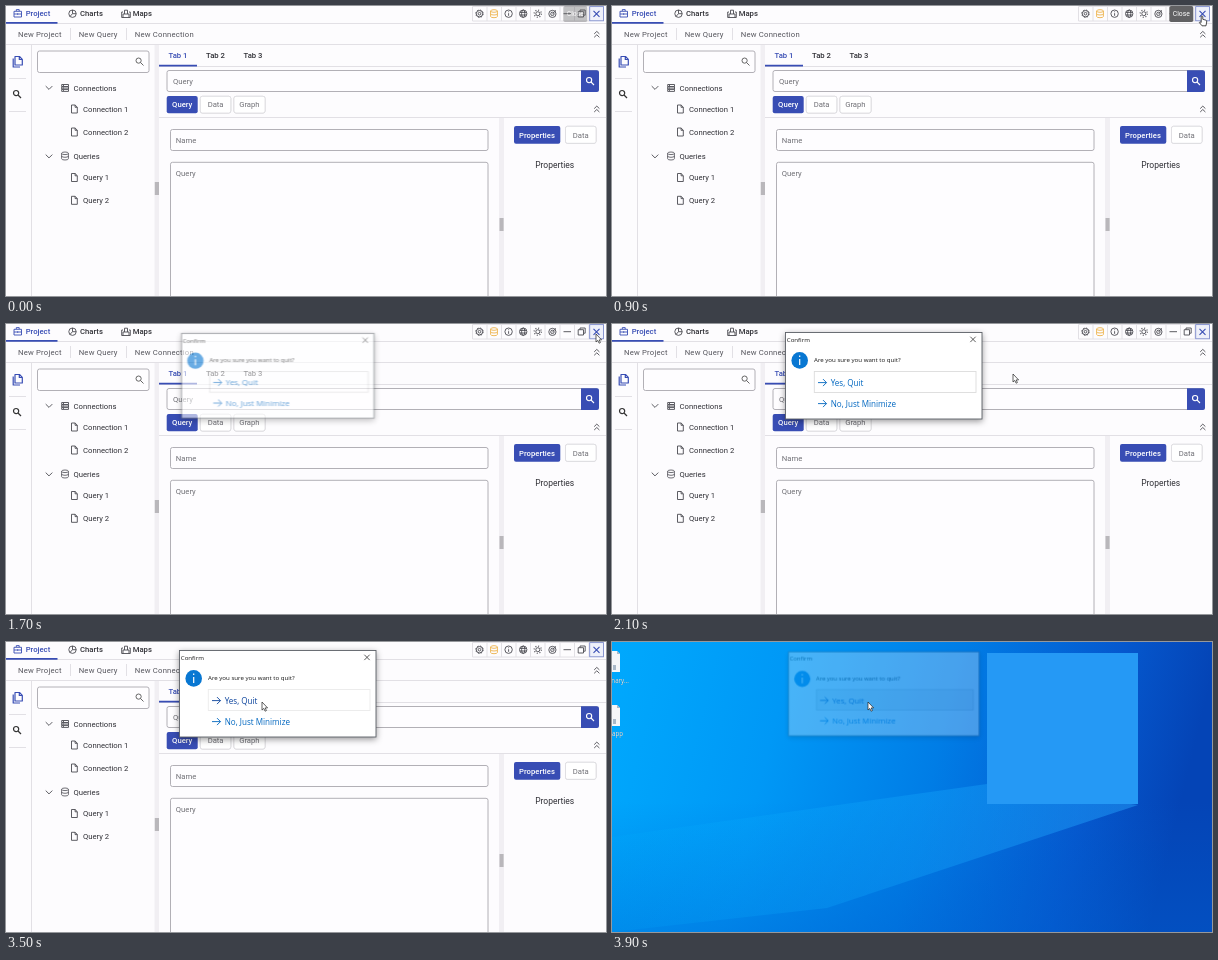
An HTML page for the animation above (4 s loop, 600 by 290 pixels).

```html
<!DOCTYPE html>
<html lang="en">
<head>
<meta charset="utf-8">
<title>Quit confirmation</title>
<style>
html, body { margin: 0; width: 100%; height: 100%; overflow: hidden; background: #fdfcfe; }
svg { display: block; width: 100vw; height: 100vh; }
text { font: 7.7px Roboto, sans-serif; fill: #303036; }
.strong { font-weight: 500; }
.mid { text-anchor: middle; }
.soft { fill: #707076; }
.blue { fill: #384db4; }
.white { fill: #fff; }
.tools text { letter-spacing: .2px; fill: #55555c; }
.icon { fill: none; stroke: #4b4b52; stroke-width: .9; stroke-linejoin: round; }
.line { fill: none; stroke: #e2e0e5; }
.field { fill: #fefdff; stroke: #aaa8ae; stroke-width: .9; }
.raised { fill: #fff; stroke: #dedce1; stroke-width: .8; filter: drop-shadow(0 .7px .7px #0003); }
.dialog text { font: 6.13px "Open Sans", sans-serif; fill: #151515; }
.dialog .choice text { font-size: 8.1px; fill: #0067c0; }
.dialog .choice path { fill: none; stroke: #0067c0; stroke-width: .9; }

.app, .tip, .hand, .arrow, .dialog, .cross, .yes rect, .yes text, .yes path {
  animation: 4s step-end infinite;
}
.app { animation-name: app; }
.tip { animation-name: tip; }
.hand { animation-name: hand; }
.arrow { animation-name: arrow; }
.cross { animation-name: app; }
.dialog { animation-name: dialog; transform-origin: 271.5px 51.5px; }
.yes rect { animation-name: row; }
.dialog .yes text { animation-name: label; }
.yes path { animation-name: mark; }

@keyframes app { 0% { opacity: 1 } 95%, 100% { opacity: 0 } }
@keyframes tip {
  0% { opacity: .38 } 2.5% { opacity: .75 } 5% { opacity: .92 } 7.5% { opacity: 1 }
  32.5% { opacity: .5 } 35%, 100% { opacity: 0 }
}
@keyframes hand { 0% { opacity: 0 } 2.5% { opacity: 1 } 35%, 100% { opacity: 0 } }
@keyframes arrow {
  0% { opacity: 0; transform: translate(590px, 10px) }
  35% { opacity: 1; transform: translate(590px, 10px) }
  47.5% { opacity: 1; transform: translate(555px, 18px) }
  50% { opacity: 1; transform: translate(481px, 36px) }
  52.5% { opacity: 1; transform: translate(401px, 50px) }
  55% { opacity: 1; transform: translate(342px, 56px) }
  57.5% { opacity: 1; transform: translate(307px, 59px) }
  60% { opacity: 1; transform: translate(288px, 60px) }
  62.5% { opacity: 1; transform: translate(279px, 60px) }
  65% { opacity: 1; transform: translate(273px, 60px) }
  67.5% { opacity: 1; transform: translate(269px, 60px) }
  70% { opacity: 1; transform: translate(266px, 60px) }
  72.5% { opacity: 1; transform: translate(264px, 60px) }
  75% { opacity: 1; transform: translate(262px, 60px) }
  77.5% { opacity: 1; transform: translate(260px, 60px) }
  80% { opacity: 1; transform: translate(258px, 60px) }
  82.5%, 100% { opacity: 1; transform: translate(256px, 60px) }
}
@keyframes dialog {
  0% { opacity: 0; transform: none }
  42.5% { opacity: .6; transform: scale(.98) }
  45% { opacity: 1; transform: none }
  97.5%, 100% { opacity: .28; transform: scale(.97) }
}
@keyframes row {
  0% { fill: #fff; stroke: #dcdcdc }
  60% { fill: #fff; stroke: #ebebeb }
  95%, 100% { fill: #ededed; stroke: #cfcfcf }
}
@keyframes label { 0% { fill: #0067c0 } 60%, 100% { fill: #0b439c } }
@keyframes mark { 0% { stroke: #0067c0 } 60%, 100% { stroke: #0b439c } }
</style>
</head>
<body>
<svg viewBox="0 0 600 290" preserveAspectRatio="none">
  <defs>
    <linearGradient id="sky" x2="1" y2=".12">
      <stop offset="0" stop-color="#00a9fd"/>
      <stop offset=".3" stop-color="#0098f6"/>
      <stop offset=".58" stop-color="#007de6"/>
      <stop offset=".84" stop-color="#0558ce"/>
      <stop offset="1" stop-color="#0444b6"/>
    </linearGradient>
    <linearGradient id="beam" x1="1" x2="0">
      <stop offset="0" stop-color="#28a8ff" stop-opacity=".45"/>
      <stop offset="1" stop-color="#00b6ff" stop-opacity=".1"/>
    </linearGradient>
    <linearGradient id="floor" x2="0" y2="1">
      <stop offset=".55" stop-color="#0060d0" stop-opacity="0"/>
      <stop offset="1" stop-color="#0060d0" stop-opacity=".4"/>
    </linearGradient>
    <g id="file" class="icon"><path d="M-2.8-4H.8L3-1.8V4H-2.8ZM.8-4V-1.7H3"/></g>
    <g id="lens" fill="none"><circle cx="-.9" cy="-.9" r="2.6"/><path d="M1 1 4 4"/></g>
    <path id="down" class="icon" d="M-3.3-1.6 0 1.7 3.3-1.6"/>
    <path id="collapse" class="icon" d="M-2.6-.4 0-2.9 2.6-.4M-2.6 3 0 .5 2.6 3"/>
    <path id="db" fill="none" d="M-3.4-2.7A3.4 1.3 0 0 1 3.4-2.7V2.7A3.4 1.3 0 0 1-3.4 2.7ZM-3.4-2.7A3.4 1.3 0 0 0 3.4-2.7M-3.4 0A3.4 1.3 0 0 0 3.4 0"/>
    <path id="go" d="M0 0H8.5M5-3.5 8.5 0 5 3.5"/>
  </defs>

  <g class="desktop">
    <path fill="url(#sky)" d="M0 0H600V290H0Z"/>
    <path fill="url(#floor)" d="M0 0H600V290H0Z"/>
    <path fill="url(#beam)" d="M375 142 526 163 215 266 0 290V195Z"/>
    <rect x="375" y="11" width="151" height="151" fill="#2599f5"/>
    <g fill="#f5f6f8">
      <path d="M0 9H5L8 12V30H0ZM0 63H5L8 66V84H0Z"/>
      <path fill="#a9b8c7" d="M1 23H4V28H1ZM1 77H4V82H1ZM5 9 8 12H5ZM5 63 8 66H5Z"/>
    </g>
    <g style="filter:drop-shadow(.5px .7px .4px #0009)">
      <text class="white" x="-6" y="41" style="font:6.2px 'Open Sans',sans-serif">binary...</text>
      <text class="white" x="0" y="94" style="font:6.2px 'Open Sans',sans-serif">app</text>
    </g>
  </g>

  <g class="app">
    <path fill="#fdfcfe" d="M0 0H600V290H0Z"/>
    <path class="line" d="M0 17.5H600M0 38.5H600M25.5 39V290M3 72.5H20M3 105.5H20M153 60.5H600M153 111.5H600"/>
    <path fill="#f1eff3" d="M148.5 39H153V290H148.5ZM493 112H498V290H493Z"/>
    <path fill="#b9b7bb" d="M148.8 176H153V189H148.8ZM493.5 212H497.6V225H493.5Z"/>
    <path class="blue" d="M0 16H51.5V17.7H0ZM153 58.8H191V60.4H153Z"/>

    <g class="icon">
      <path stroke="#384db4" d="M8 5.3H15.5V11H8ZM10.3 5V3.6H13.2V5M8 8H15.5M11.7 7.3V8.8"/>
      <circle cx="66.5" cy="7.7" r="3.7"/><path d="M66.5 4V7.7H70.2M66.5 7.7 64 10.4"/>
      <path d="M117 8H123V11.5H117ZM118.5 8V4.2H121.5V8M117 6H115.7V11.5H117M123 6H124.3V11.5H123"/>
    </g>
    <text class="strong blue" x="19.7" y="10.4">Project</text>
    <text class="strong" x="74" y="10.4">Charts</text>
    <text class="strong" x="126.7" y="10.4">Maps</text>

    <path class="line" d="M466.5 .5H583V15H466.5ZM481 0V15M495.5 0V15M510 0V15M524.5 0V15M539 0V15M554 0V15M568.5 0V15"/>
    <g class="icon" stroke-width=".8">
      <circle cx="473.5" cy="7.7" r="1.3"/><circle cx="473.5" cy="7.7" r="3.2"/>
      <circle cx="473.5" cy="7.7" r="3.7" stroke-dasharray="1.5 1.4"/>
      <use href="#db" x="488" y="7.7" stroke="#eeb34b"/>
      <circle cx="502.6" cy="7.7" r="3.7"/><path d="M502.6 7.2V9.8M502.6 5.4V6.2"/>
      <circle cx="517.2" cy="7.7" r="3.7"/><ellipse cx="517.2" cy="7.7" rx="1.6" ry="3.7"/><path d="M513.8 6.4H520.6M513.8 9H520.6"/>
      <circle cx="531.8" cy="7.7" r="2"/><circle cx="531.8" cy="7.7" r="3.6" stroke-dasharray=".9 1.93" stroke-width="1.3"/>
      <circle cx="546.4" cy="7.9" r="3.6"/><circle cx="546.4" cy="7.9" r="1.7"/><path d="M546.4 7.9 550 4.3"/>
      <path d="M557.5 7.7H565M572.2 5.7H577.5V11H572.2ZM574 5.7V4H579.2V9.2H577.5"/>
    </g>
    <rect x="583.7" y=".6" width="13.8" height="14.2" fill="#eef0fa" stroke="#7d8acb" stroke-width=".9"/>
    <path d="M587.5 4.8 593.5 10.8M593.5 4.8 587.5 10.8" stroke="#384db4" stroke-width="1.1"/>

    <g class="tools">
      <text x="12" y="31">New Project</text>
      <text x="72.7" y="31">New Query</text>
      <text x="128.8" y="31">New Connection</text>
      <path class="line" d="M64.5 22V34M120.5 22V34"/>
    </g>
    <use href="#collapse" x="590.8" y="28.3"/>
    <use href="#collapse" x="590.8" y="103"/>

    <path class="icon" stroke="#384db4" style="stroke:#384db4;stroke-width:1.2" d="M9 50.5H13.5L16.3 53.3V59H9ZM13.3 50.5V53.5H16.3M7.2 52.5V61H14"/>
    <use href="#lens" x="11" y="88" stroke="#333" stroke-width="1.2"/>

    <rect class="field" x="31.5" y="45" width="111.5" height="21.5" rx="2"/>
    <use href="#lens" x="133.5" y="55.5" stroke="#555" stroke-width=".9"/>
    <use href="#down" x="43" y="81.7"/>
    <use href="#down" x="43" y="150.2"/>
    <path class="icon" d="M55.7 78.5H62.5V80.6H55.7ZM55.7 80.9H62.5V83H55.7ZM55.7 83.3H62.5V85.4H55.7ZM57 79.5H58M57 82H58M57 84.4H58"/>
    <use href="#db" x="59" y="150" stroke="#4b4b52" stroke-width=".8"/>
    <use href="#file" x="68.3" y="103"/>
    <use href="#file" x="68.3" y="126"/>
    <use href="#file" x="68.3" y="171.5"/>
    <use href="#file" x="68.3" y="194.3"/>
    <text x="67.5" y="84.6">Connections</text>
    <text x="77" y="105.5">Connection 1</text>
    <text x="77" y="128.5">Connection 2</text>
    <text x="67.5" y="153.1">Queries</text>
    <text x="77" y="174.2">Query 1</text>
    <text x="77" y="197">Query 2</text>

    <text class="strong mid blue" x="172" y="52.2">Tab 1</text>
    <text class="strong mid" x="209.5" y="52.2">Tab 2</text>
    <text class="strong mid" x="247" y="52.2">Tab 3</text>

    <rect class="field" x="161" y="64.5" width="431" height="21" rx="2"/>
    <path class="blue" d="M575 64.2H591A2 2 0 0 1 593 66.2V84A2 2 0 0 1 591 86H575Z"/>
    <use href="#lens" x="584" y="75" stroke="#fff" stroke-width="1.1"/>
    <text class="soft" x="167" y="77.6">Query</text>

    <rect class="blue" x="160.7" y="90" width="31" height="17.3" rx="2"/>
    <rect class="raised" x="194.3" y="90.3" width="30.5" height="16.7" rx="2"/>
    <rect class="raised" x="228" y="90.3" width="31" height="16.7" rx="2"/>
    <text class="strong mid white" x="176.2" y="101.4">Query</text>
    <text class="mid soft" x="209.6" y="101.4">Data</text>
    <text class="mid soft" x="243.4" y="101.4">Graph</text>

    <rect class="field" x="164.5" y="123.5" width="317.5" height="21" rx="2"/>
    <rect class="field" x="164.5" y="156.3" width="317.5" height="150" rx="2"/>
    <text class="soft" x="169.8" y="136.8">Name</text>
    <text class="soft" x="169.8" y="170.2">Query</text>

    <rect class="blue" x="508" y="120" width="46.3" height="17.8" rx="2"/>
    <rect class="raised" x="559.5" y="120.3" width="30.5" height="17" rx="2"/>
    <text class="strong mid white" x="531" y="131.6">Properties</text>
    <text class="mid soft" x="574.7" y="131.6">Data</text>
    <text class="mid" x="548.7" y="162.3" style="font-size:8.5px">Properties</text>
  </g>

  <g class="tip">
    <rect x="557.3" y="0" width="24" height="16" rx="1.8" fill="#616163"/>
    <text class="mid white" x="569.3" y="10.4" style="font-size:6.8px">Close</text>
  </g>

  <g class="dialog">
    <rect x="173.5" y="8.5" width="196.5" height="86.5" fill="#fff" stroke="#5c6067" stroke-width=".9" style="filter:drop-shadow(0 2px 3px #0006)"/>
    <text x="174.8" y="18">Confirm</text>
    <path class="cross" d="M358.3 12.7 363.7 18.1M363.7 12.7 358.3 18.1" stroke="#333" stroke-width=".8"/>
    <circle cx="187.7" cy="36.4" r="8.3" fill="#0877d2"/>
    <path d="M187.7 35V41M187.7 31.4V33" stroke="#fff" stroke-width="1.2"/>
    <text x="202" y="37.7">Are you sure you want to quit?</text>
    <g class="choice yes">
      <rect x="202.3" y="47.5" width="161.7" height="21" stroke-width=".9"/>
      <use href="#go" x="0" y="0" display="none"/>
      <path d="M206 58.6H214.5M211 55.1 214.5 58.6 211 62.1"/>
      <text x="218.7" y="61.6">Yes, Quit</text>
    </g>
    <g class="choice">
      <path d="M206 79.6H214.5M211 76.1 214.5 79.6 211 83.1"/>
      <text x="218.7" y="82.6">No, Just Minimize</text>
    </g>
  </g>

  <path class="hand" d="M589.2 16V10.4Q590 9.3 590.8 10.4V13.3L594 14.2Q595 14.6 594.7 16L594 19.8H590L587.4 16.6Q587.5 15.2 589.2 16.4Z" fill="#fff" stroke="#222" stroke-width=".8"/>
  <path class="arrow" d="M0 0V8L1.8 6.4 3.1 9.2 4.4 8.6 3.2 5.9H5.6Z" fill="#fff" stroke="#222" stroke-width=".7" stroke-linejoin="round"/>
</svg>
</body>
</html>
```
